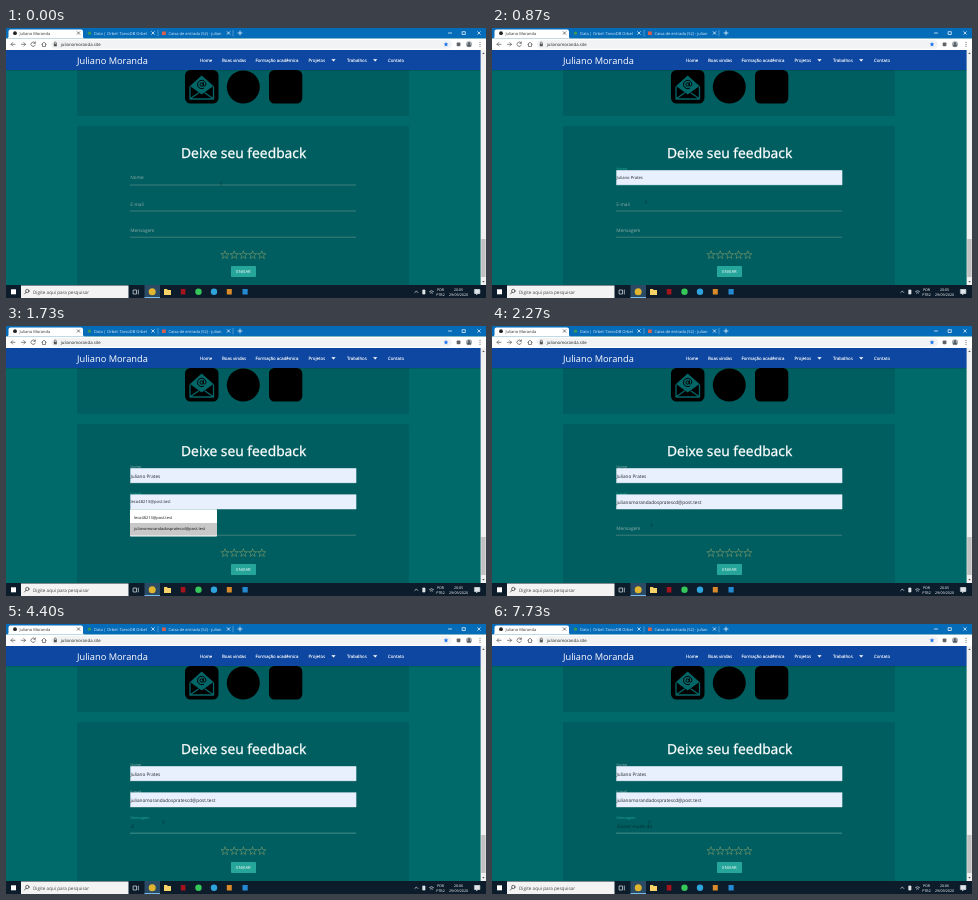
An HTML page for the animation above (8 s loop, 480 px wide and 270 px high).

```html
<!DOCTYPE html>
<html lang="pt-BR">
<head>
<meta charset="utf-8">
<title>Deixe seu feedback</title>
<style>
  html, body { margin: 0; width: 100%; height: 100%; overflow: hidden; background: #00696a; }
  svg { display: block; width: 100vw; height: 100vh; font: 4.7px "Open Sans", "Noto Sans", sans-serif; text-rendering: geometricPrecision; }
  .tab { font-size: 4px; fill: #dcebf7; }
  .nav { font-size: 4.33px; fill: #fff; stroke: #fff; stroke-width: .12; }
  .brand { font-size: 9.25px; fill: #fff; }
  .title { font: 500 13.8px "Noto Sans", "Open Sans", sans-serif; fill: #fff; stroke: #fff; stroke-width: .25; }
  .tray { font-size: 3.6px; fill: #fff; text-anchor: middle; }
  .line { fill: none; stroke-width: .7; stroke-linecap: round; stroke-linejoin: round; }
  .rule { stroke: #76998f; stroke-width: .55; }
  .focus { stroke: #2a8f87; stroke-width: .65; }
  .label { fill: #93adaa; }
  .fill { fill: #e8f0fe; }
  .value { fill: #202327; }
  .preview { font-size: 4.15px; fill: #202327; }
  .item { font-size: 3.95px; fill: #111; }
  .message { fill: #000; fill-opacity: .55; }
  #mouse { animation: mouse 8s infinite; }
  @keyframes mouse {
    0%, 2.5% { transform: translate(215px, 155.5px); animation-timing-function: ease-in-out; }
    9%, 16% { transform: translate(154px, 174px); animation-timing-function: ease-in-out; }
    21%, 25% { transform: translate(166px, 203px); animation-timing-function: ease-out; }
    31%, 100% { transform: translate(157.5px, 198px); }
  }
</style>
</head>
<body>
<svg viewBox="0 0 480 270" preserveAspectRatio="none">
  <defs>
    <path id="star" d="M0-4.3 1-1.4 4.1-1.3 1.7.6 2.5 3.5 0 1.8-2.5 3.5-1.7.6-4.1-1.3-1-1.4Z"/>
    <path id="close" d="M-1.3-1.3 1.3 1.3M1.3-1.3-1.3 1.3"/>
  </defs>

  <!-- page -->
  <rect width="480" height="270" fill="#00696a"/>
  <g fill="#005e60">
    <rect x="71" y="36" width="332" height="52" rx="1.5"/>
    <rect x="71" y="98" width="332" height="164" rx="1.5"/>
  </g>
  <rect x="179" y="42" width="33.5" height="33.5" rx="5.5"/>
  <path d="M184 58 195.700 47.500 207.500 58 195.700 66.500Z" fill="#006668"/>
  <path class="line" stroke="#006668" style="stroke-width:1.3" d="M184 59V71H207.500V59M184.500 70.500 192.500 65M207 70.500 199 65"/>
  <g class="line" stroke="#000" style="stroke-width:1">
    <circle cx="195.700" cy="56.500" r="1.700"/>
    <path d="M197.400 54.800V57C197.400 58.700 199.900 58.500 199.900 56.300A4.200 4.200 0 1 0 197.700 60.200"/>
  </g>
  <circle cx="237.300" cy="59" r="16.500"/>
  <rect x="263" y="42" width="33.300" height="33.500" rx="5.5"/>
  <text class="title" x="237.700" y="130" text-anchor="middle">Deixe seu feedback</text>

  <!-- form -->
  <path class="rule" d="M124 157H350M124 183H350M124 209.200H350"/>
  <path class="focus" data-show="130-1130" d="M124 157H350"/>
  <path class="focus" data-show="1130-2870" d="M124 183H350"/>
  <path class="focus" data-show="2870-8000" d="M124 209.200H350"/>
  <g transform="translate(124.300 151.400)"><text class="label" data-lift="130-1130">Nome</text></g>
  <g transform="translate(124.300 177.500)"><text class="label" data-lift="1130-2870">E-mail</text></g>
  <g transform="translate(124.300 203.700)"><text class="label" data-lift="2870-8000">Mensagem</text></g>

  <rect class="fill" x="124.300" y="142.200" width="226" height="14.700" data-show="530-8000"/>
  <text class="preview" x="124.500" y="151.400" data-show="530-930">Juliano Prates</text>
  <text class="value" x="124.500" y="151.500" data-show="930-8000">Juliano Prates</text>
  <rect class="fill" x="124.300" y="168.400" width="226" height="14.700" data-show="1470-8000"/>
  <text class="preview" x="124.500" y="177.400" data-show="1470-1800">leco48213@post.test</text>
  <text class="preview" x="124.500" y="177.400" data-show="1800-2000">julianomorandadospratescd@post.test</text>
  <text class="value" x="124.500" y="177.600" data-show="2000-8000">julianomorandadospratescd@post.test</text>
  <text class="message" id="message" x="125" y="204.200" xml:space="preserve"></text>

  <g fill="none" stroke="#98a66e" stroke-width=".5">
    <use href="#star" x="219" y="227"/><use href="#star" x="228.200" y="227"/><use href="#star" x="237.400" y="227"/>
    <use href="#star" x="246.600" y="227"/><use href="#star" x="255.800" y="227"/>
  </g>
  <rect x="225" y="238" width="25" height="11" rx=".8" fill="#26a69a"/>
  <text x="237.500" y="244.900" font-size="4.200" fill="#fff" text-anchor="middle">ENVIAR</text>

  <!-- suggestions -->
  <g data-show="330-800">
    <rect x="124" y="157" width="87" height="27.500" rx=".8" fill="#fff"/>
    <rect x="124" y="171" width="87" height="12" fill="#c8c8c8" data-show="530-800"/>
    <text class="item" x="128" y="166.500">Juliano</text>
    <text class="item" x="128" y="178">Juliano Prates</text>
  </g>
  <g data-show="1270-1930">
    <rect x="124" y="183.200" width="87" height="27.300" rx=".8" fill="#fff"/>
    <rect x="124" y="185.500" width="87" height="11.500" fill="#c8c8c8" data-show="1470-1670"/>
    <rect x="124" y="197" width="87" height="12.500" fill="#c8c8c8" data-show="1670-1930"/>
    <text class="item" x="128" y="192.600">leco48213@post.test</text>
    <text class="item" x="128" y="204">julianomorandadospratescd@post.test</text>
  </g>

  <!-- site header -->
  <rect y="22" width="475" height="20" fill="#0d47a1"/>
  <rect y="42" width="475" height="1" fill="#000" opacity=".1"/>
  <text class="brand" x="71" y="36">Juliano Moranda</text>
  <g class="nav">
    <text x="194" y="34">Home</text>
    <text x="216" y="34">Boas vindas</text>
    <text x="249.500" y="34">Formação acadêmica</text>
    <text x="302.500" y="34">Projetos</text>
    <text x="341" y="34">Trabalhos</text>
    <text x="382" y="34">Contato</text>
    <path d="M325.500 31.300h4l-2 2.200zM367.200 31.300h4l-2 2.200z"/>
  </g>
  <rect x="474.600" y="22" width="5.400" height="235" fill="#f1f1f1"/>
  <rect x="475.200" y="211" width="4.400" height="38" fill="#c1c1c1"/>
  <path d="M476.200 26h2.600l-1.300-1.600zM476.200 253h2.600l-1.300 1.600z" fill="#555"/>

  <!-- browser -->
  <rect width="480" height="10.500" fill="#056cba"/>
  <path d="M1 10.500Q2.500 10.500 2.500 8.500V3.500Q2.500 1.500 4.500 1.500H75Q77 1.500 77 3.500V8.500Q77 10.500 78.500 10.500Z" fill="#fff"/>
  <circle cx="9" cy="5.200" r="1.900" fill="#222"/>
  <text class="tab" x="13.500" y="6.600" style="fill:#333">Juliano Moranda</text>
  <circle cx="83.500" cy="5.200" r="1.600" fill="#3c9a50"/>
  <text class="tab" x="88" y="6.600">Data | Orbel: TarvoDB Orbel</text>
  <rect x="156" y="3.500" width="3.800" height="3.500" fill="#d9604a"/>
  <text class="tab" x="162.500" y="6.600">Caixa de entrada (52) - julian</text>
  <g class="line" stroke="#fff">
    <use href="#close" x="72.500" y="5" stroke="#444"/>
    <use href="#close" x="147" y="5"/><use href="#close" x="222.500" y="5"/><use href="#close" x="473" y="5"/>
    <path d="M152 2.500v5.500M227 2.500v5.500" opacity=".4"/>
    <path d="M232 5h4M234 3v4M442.500 5h3M456.500 3.700h2.800v2.800h-2.800z"/>
  </g>
  <rect y="10.500" width="480" height="11.500" fill="#fff"/>
  <rect x="45" y="12" width="401" height="8.800" rx="4.400" fill="#f1f3f4"/>
  <g class="line" stroke="#555">
    <path d="M9 16.300H5M6.800 14.500 5 16.300 6.800 18.100M15.500 16.300H19.500M17.700 14.500 19.500 16.300 17.700 18.100"/>
    <path d="M29 14.900A2.200 2.200 0 1 0 29.300 17M29.300 13.800V15.300H27.800"/>
    <path d="M35.700 16.300 38 14.200 40.300 16.300M36.500 16V18.500H39.500V16"/>
    <path d="M48.300 16V15a1 1 0 0 1 2 0V16"/>
  </g>
  <rect x="47.800" y="15.800" width="3" height="2.500" fill="#555"/>
  <text x="54.700" y="17.900" font-size="4.300" fill="#222">julianomoranda.site</text>
  <use href="#star" transform="translate(440 16.400) scale(.6)" fill="#1a73e8"/>
  <rect x="450.700" y="14.500" width="3.700" height="3.700" rx=".8" fill="#5f6368"/>
  <circle cx="463" cy="16.300" r="3" fill="#a3a9ae"/>
  <path d="M461 18.500a2 2.300 0 0 1 4 0zM462 15.300a1 1 0 0 1 2 0 1 1 0 0 1-2 0" fill="#4c545b"/>
  <g fill="#555"><circle cx="474" cy="14.300" r=".55"/><circle cx="474" cy="16.300" r=".55"/><circle cx="474" cy="18.300" r=".55"/></g>

  <!-- taskbar -->
  <rect y="257" width="480" height="13" fill="#0c1c2b"/>
  <rect x="5" y="261.300" width="5" height="5" fill="#fff"/>
  <rect x="15" y="257.500" width="107.500" height="12.500" fill="#f3f3f3"/>
  <g class="line" stroke="#333"><circle cx="21.300" cy="263" r="1.700"/><path d="M20 264.300 18.500 266"/></g>
  <text x="27" y="265.500" font-size="4.600" fill="#444">Digite aqui para pesquisar</text>
  <g class="line" stroke="#dfe5ea">
    <path d="M127.500 262h3v4h-3zM132.300 262v4"/>
    <path d="M408.800 264.500 410.300 263 411.800 264.500M423.500 263.500q2-1.800 4 0M424.400 265q1.100-1 2.200 0"/>
    <path d="M417 262h2v4h-2zM468.800 261.500h5v4h-2l-1.200 1.300v-1.300h-1.800z" fill="#dfe5ea"/>
  </g>
  <rect x="138.500" y="257" width="15.500" height="13" fill="#2b4a63"/>
  <rect x="138.500" y="269" width="15.500" height="1" fill="#76b9ed"/>
  <circle cx="146.200" cy="263.700" r="3.500" fill="#e0b52f"/>
  <path d="M158 261h3l.7 1h3.300v5h-7z" fill="#f7d268"/>
  <rect x="174.800" y="261" width="4.600" height="5.500" fill="#a5131c"/>
  <circle cx="192.500" cy="263.700" r="3.200" fill="#35c759"/>
  <circle cx="208" cy="263.700" r="3.200" fill="#2fa3dc"/>
  <rect x="220.800" y="261" width="5" height="5.500" fill="#d98a2a"/>
  <rect x="236.500" y="261" width="5.200" height="5.500" fill="#2489d1"/>
  <g class="tray">
    <text x="434.500" y="262.600">POR</text><text x="434.500" y="267.900">PTB2</text>
    <text x="452.500" y="262.600" data-show="0-2400">20:05</text>
    <text x="452.500" y="262.600" data-show="2400-8000">20:06</text>
    <text x="452.500" y="267.900">29/09/2020</text>
  </g>

  <g id="mouse" class="line" stroke="#06262a" opacity=".75">
    <path d="M0-1.300V1.300" data-show="0-1270"/>
    <path d="M0-1.300V1.300" data-show="2000-8000"/>
  </g>
</svg>
<script>
  const LOOP = 8000;
  const at = (ms, props) => ({ offset: ms / LOOP, ...props });
  const loop = (el, frames) => el.animate(frames, { duration: LOOP, iterations: Infinity });

  function show(el, from, to = LOOP) {
    const state = (ms, visibility) => at(ms, { visibility, easing: 'steps(1, end)' });
    loop(el, [state(0, 'hidden'), state(from, 'visible'), state(to, 'hidden'), state(LOOP, 'hidden')]);
  }

  // A label floats up on focus and turns grey again on blur.
  function lift(el, from, to) {
    const rest = { transform: 'translateY(0px) scale(1)', fill: '#93adaa' };
    const up = { transform: 'translateY(-9px) scale(.8)', fill: '#26a69a' };
    const end = to < LOOP ? { ...up, fill: rest.fill } : up;
    loop(el, [at(0, rest), at(from, { ...rest, easing: 'ease-out' }), at(from + 130, up),
      at(to, up), at(Math.min(to + 130, LOOP), end), at(LOOP, end)]);
  }

  const span = text => text.split('-').map(Number);
  document.querySelectorAll('[data-show]').forEach(el => show(el, ...span(el.dataset.show)));
  document.querySelectorAll('[data-lift]').forEach(el => lift(el, ...span(el.dataset.lift)));

  const keys = [3470, 4530, 4670, 5000, 5130, 5670, 6000, 6270, 6600, 6870, 7000, 7130, 7400, 7530, 7730];
  [...'Gostei muito do'].forEach((char, i) => {
    const key = document.createElementNS('http://www.w3.org/2000/svg', 'tspan');
    key.textContent = char;
    document.getElementById('message').append(key);
    show(key, keys[i]);
  });
</script>
</body>
</html>
```
